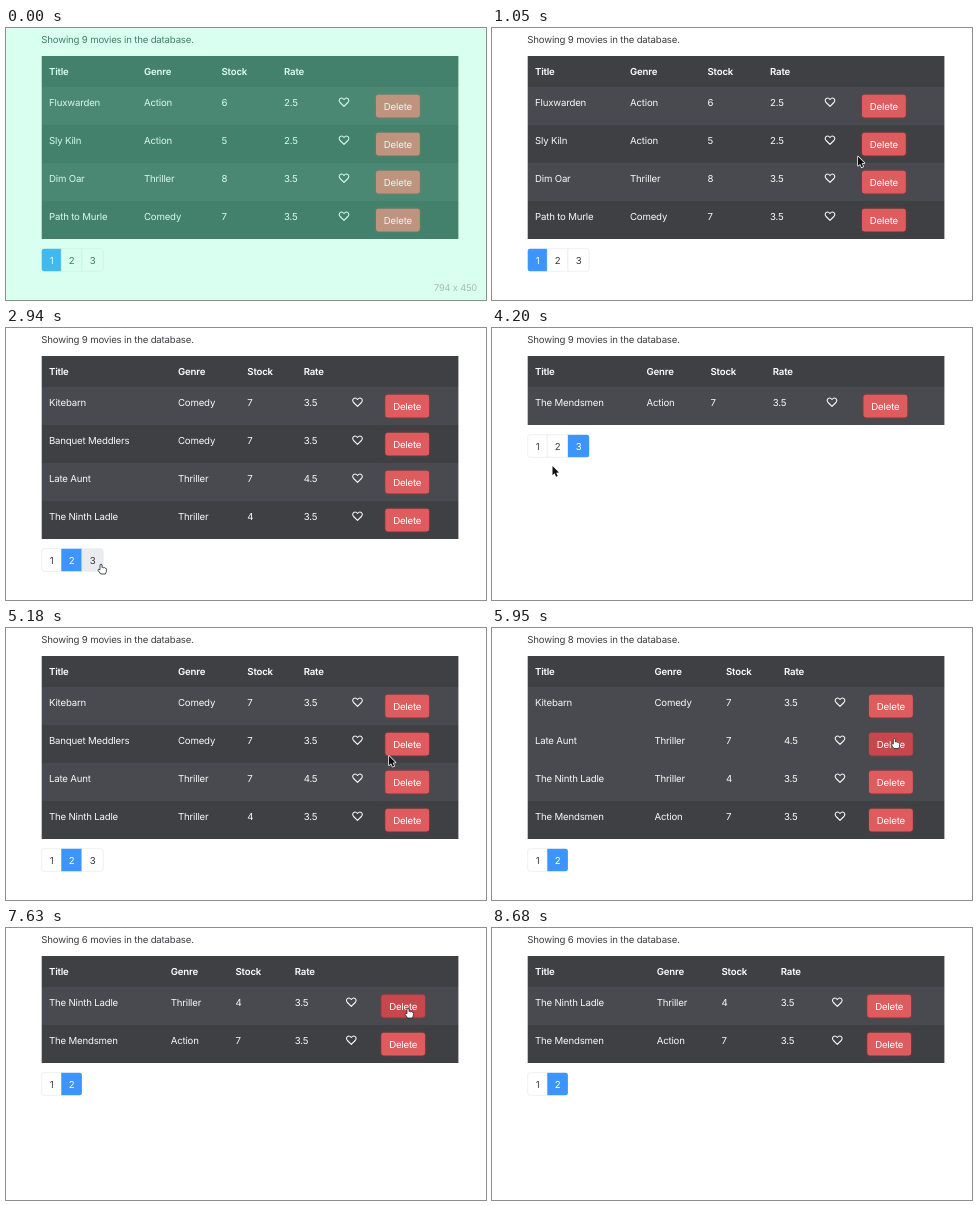
An HTML page with a canvas for the animation above (8.82 s loop, 480x272 px).

```html
<!DOCTYPE html>
<html lang="en">
<head>
<meta charset="utf-8">
<title>Movie table</title>
<style>
  html, body { margin: 0; width: 100%; height: 100%; overflow: hidden; background: #fff; }
  canvas { display: block; width: 480px; height: 272px; }
</style>
</head>
<body>
<canvas id="stage"></canvas>
<script>
const W = 480, H = 272, LOOP = 8820, STEP = 70;
const LEFT = 35.7, RIGHT = 452.4, HEAD_TOP = 28, ROWS_TOP = 59, ROW_H = 38;
const FONT = 'Inter, Roboto, sans-serif';

const canvas = document.getElementById('stage');
const ctx = canvas.getContext('2d');
const dpr = window.devicePixelRatio || 1;
canvas.width = W * dpr;
canvas.height = H * dpr;

const movies = {
  flux: ['Fluxwarden', 'Action', '6', '2.5'],
  kiln: ['Sly Kiln', 'Action', '5', '2.5'],
  oar: ['Dim Oar', 'Thriller', '8', '3.5'],
  path: ['Path to Murle', 'Comedy', '7', '3.5'],
  kite: ['Kitebarn', 'Comedy', '7', '3.5'],
  banquet: ['Banquet Meddlers', 'Comedy', '7', '3.5'],
  aunt: ['Late Aunt', 'Thriller', '7', '4.5'],
  ladle: ['The Ninth Ladle', 'Thriller', '4', '3.5'],
  mend: ['The Mendsmen', 'Action', '7', '3.5']
};

// Column positions: title, genre, stock, rate, heart centre, button left
const firstCols = [43, 138, 215.5, 278, 338, 370];
const wideCols = [43, 172, 241.3, 297.7, 351.5, 379.3];
const soloCols = [43, 154.5, 218.5, 280.8, 340, 371.5];
const eightCols = [43, 162.5, 234, 292, 348, 377];
const sixCols = [43, 164.7, 229.5, 288.8, 345.3, 375.3];

const view = (start, count, pages, page, cols, keys) =>
  ({ start, count, pages, page, cols, rows: keys.split(' ').map(k => movies[k]) });

const views = [
  view(0, 9, 3, 1, firstCols, 'flux kiln oar path'),
  view(2450, 9, 3, 2, wideCols, 'kite banquet aunt ladle'),
  view(3150, 9, 3, 3, soloCols, 'mend'),
  view(4480, 9, 3, 2, wideCols, 'kite banquet aunt ladle'),
  view(5950, 8, 2, 2, eightCols, 'kite aunt ladle mend'),
  view(6790, 7, 2, 2, eightCols, 'kite ladle mend'),
  view(7560, 6, 2, 2, sixCols, 'ladle mend')
];

// Pointer path: time, x, y
const pointerPath = [
  [560, 330, 280], [840, 362, 140], [1050, 366, 128.6], [1330, 290, 180],
  [1610, 130, 260], [1820, 66, 240], [1960, 65, 234], [2520, 65, 233],
  [2800, 88, 238], [2940, 95, 236], [3220, 95, 236], [3570, 70, 230],
  [3850, 70, 230], [4200, 60.5, 138], [4340, 65, 121], [4620, 65, 121],
  [5180, 383, 128], [5390, 392, 119], [5810, 402.3, 110.5], [7350, 402.3, 110.5],
  [7490, 402, 80], [7630, 402, 80], [8190, 311, 209], [8610, 257, 274]
];

function pointerAt(t) {
  const i = pointerPath.findIndex(p => p[0] > t);
  if (i < 1) return null;
  const [t0, x0, y0] = pointerPath[i - 1], [t1, x1, y1] = pointerPath[i];
  const u = (t - t0) / (t1 - t0), k = u * u * (3 - 2 * u);
  return { x: x0 + (x1 - x0) * k, y: y0 + (y1 - y0) * k };
}

const inside = (p, x, y, w, h) => p && p.x >= x && p.x <= x + w && p.y >= y && p.y <= y + h;

function text(str, x, baseline, color, { weight = 400, align = 'left', size = 9.64 } = {}) {
  ctx.font = `${weight} ${size}px ${FONT}`;
  ctx.letterSpacing = '-0.18px';
  ctx.textRendering = 'geometricPrecision';
  ctx.textAlign = align;
  ctx.fillStyle = color;
  ctx.fillText(str, x, baseline);
}

function rect(x, y, w, h, color) {
  ctx.fillStyle = color;
  ctx.fillRect(x, y, w, h);
}

function roundRect(x, y, w, h, radii, fill, stroke) {
  ctx.beginPath();
  ctx.roundRect(x, y, w, h, radii);
  ctx.fillStyle = fill;
  ctx.fill();
  if (!stroke) return;
  ctx.strokeStyle = stroke;
  ctx.lineWidth = 0.7;
  ctx.stroke();
}

function heart(x, y) {
  ctx.beginPath();
  ctx.moveTo(x, y + 4.2);
  ctx.lineTo(x - 3.9, y + 0.3);
  ctx.bezierCurveTo(x - 6.6, y - 2.8, x - 2.6, y - 6, x, y - 2.7);
  ctx.bezierCurveTo(x + 2.6, y - 6, x + 6.6, y - 2.8, x + 3.9, y + 0.3);
  ctx.closePath();
  ctx.strokeStyle = '#f8f8f9';
  ctx.lineWidth = 1.1;
  ctx.lineJoin = 'round';
  ctx.stroke();
}

function deleteButton(x, y, w, h, hover) {
  ctx.save();
  ctx.shadowColor = 'rgba(190, 50, 60, 0.7)';
  ctx.shadowBlur = 2.5 * dpr;
  roundRect(x, y, w, h, 2.4, hover ? '#c6474c' : '#de5c5d');
  ctx.restore();
  text('Delete', x + w / 2, y + 14.7, '#fff', { align: 'center' });
}

function drawTable({ rows, cols }, pointer) {
  const bx = cols[5], bw = 43.8, bh = 22.6;
  let overButton = false;
  rect(LEFT, HEAD_TOP, RIGHT - LEFT, ROWS_TOP - HEAD_TOP, '#3f4044');
  ['Title', 'Genre', 'Stock', 'Rate'].forEach((label, i) =>
    text(label, cols[i], 47.4, '#fff', { weight: 600 }));

  rows.forEach((row, r) => {
    const y = ROWS_TOP + r * ROW_H, by = y + 7.8;
    const hover = inside(pointer, bx, by, bw, bh);
    overButton = overButton || hover;
    rect(LEFT, y, RIGHT - LEFT, ROW_H, r % 2 === 0 || hover ? '#494a4f' : '#3f4044');
    row.forEach((cell, i) => text(cell, cols[i], y + 18.6, '#f8f8f9'));
    heart(cols[4], y + 15.2);
    deleteButton(bx, by, bw, bh, hover);
  });
  return overButton;
}

function drawPager({ rows, pages, page }, pointer) {
  const y = ROWS_TOP + rows.length * ROW_H + 9.7, h = 22.6;
  const edges = [LEFT, 55.3, 75.9, 97.2];
  let overLink = false;
  for (let n = 1; n <= pages; n++) {
    const x = edges[n - 1], w = edges[n] - x;
    const active = n === page, hover = inside(pointer, x, y, w, h);
    overLink = overLink || hover;
    const l = n === 1 ? 2.4 : 0, r = n === pages ? 2.4 : 0;
    const fill = active ? '#3d94fb' : hover ? '#e9ecef' : '#fff';
    roundRect(x, y, w, h, [l, r, r, l], fill, active ? null : '#e8eaec');
    text(String(n), x + w / 2, y + 15, active ? '#fff' : '#3c3d40', { align: 'center' });
  }
  return overLink;
}

function polygon(points) {
  ctx.beginPath();
  points.forEach(([x, y]) => ctx.lineTo(x, y));
  ctx.closePath();
}

function drawArrow() {
  polygon([[0, 0], [0, 9.2], [2.1, 7.3], [3.6, 10.7], [5.2, 10], [3.7, 6.7], [6.5, 6.5]]);
  ctx.lineWidth = 1.4;
  ctx.strokeStyle = '#fff';
  ctx.stroke();
  ctx.fillStyle = '#111';
  ctx.fill();
}

function drawHand() {
  ctx.beginPath();
  ctx.moveTo(-1, 5.6);
  ctx.lineTo(-1, 0.8);
  ctx.quadraticCurveTo(0, -0.8, 1, 0.8);
  ctx.lineTo(1, 3.5);
  ctx.quadraticCurveTo(2, 2.6, 2.7, 3.8);
  ctx.quadraticCurveTo(3.8, 3.1, 4.3, 4.3);
  ctx.quadraticCurveTo(5.5, 4, 5.5, 5.3);
  ctx.quadraticCurveTo(5.6, 8, 4.4, 10);
  ctx.lineTo(-0.4, 10);
  ctx.lineTo(-3, 6.2);
  ctx.quadraticCurveTo(-2.8, 4.6, -1, 5.6);
  ctx.closePath();
  ctx.fillStyle = '#fff';
  ctx.fill();
  ctx.strokeStyle = '#222';
  ctx.lineWidth = 0.8;
  ctx.stroke();
}

function drawPointer(p, overLink) {
  if (!p) return;
  ctx.save();
  ctx.translate(p.x, p.y);
  ctx.lineJoin = 'round';
  overLink ? drawHand() : drawArrow();
  ctx.restore();
}

// Green wash: scale each channel, then lift it
function drawTint(t) {
  const strength = 1 - t / 420;
  if (strength <= 0) return;
  ctx.save();
  ctx.globalAlpha = strength;
  ctx.globalCompositeOperation = 'multiply';
  rect(0, 0, W, H, 'rgb(199, 168, 182)');
  ctx.globalCompositeOperation = 'lighter';
  rect(0, 0, W, H, 'rgb(18, 87, 59)');
  ctx.globalCompositeOperation = 'source-over';
  text('794 x 450', 471, 262.6, '#9fbfb2', { align: 'right', size: 9.3 });
  ctx.restore();
}

function draw(t) {
  const current = views.filter(v => v.start <= t).pop();
  const pointer = pointerAt(t);
  ctx.setTransform(dpr, 0, 0, dpr, 0, 0);
  rect(0, 0, W, H, '#fff');
  text(`Showing ${current.count} movies in the database.`, 35.3, 15.2, '#3c3d40');
  const overButton = drawTable(current, pointer);
  const overPage = drawPager(current, pointer);
  drawPointer(pointer, overButton || overPage);
  drawTint(t);
}

const began = performance.now();
function tick() {
  const t = (performance.now() - began) % LOOP;
  draw(Math.floor(t / STEP) * STEP);
  requestAnimationFrame(tick);
}
tick();
</script>
</body>
</html>
```
